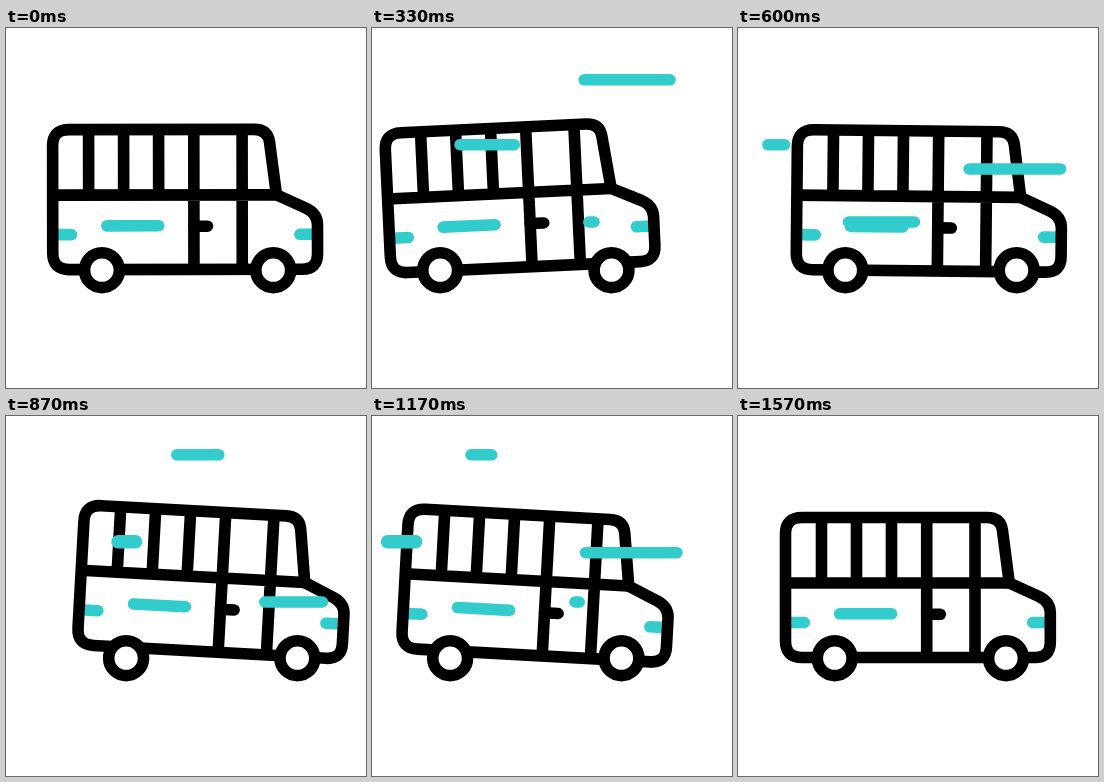
Animation of 360 by 360 pixels, one loop 1670 ms. Source, as an HTML page:

```html
<!DOCTYPE html>
<html lang="en">
<head>
<meta charset="utf-8">
<title>Bus ride</title>
<style>
  html, body { margin: 0; width: 100%; height: 100%; overflow: hidden; background: #fff; }
  svg { display: block; width: 100vw; height: 100vh; }
  path, circle { fill: none; stroke: #000; stroke-width: 11.6; stroke-linejoin: round; }
  .teal { stroke: #33cccc; stroke-linecap: round; }
  circle { fill: #fff; }
</style>
</head>
<body>
<svg viewBox="0 0 360 360">
  <g id="bus">
    <g id="body">
      <path class="teal" d="M50 206.5H66.3M294.7 206.5H310M101.6 197.8H153.6"/>
      <path d="M47.5 118Q47.5 101.5 64 101.5H249Q262.5 101.5 264.4 114L271.3 167L301 180.5Q312.3 186 312.3 197V226Q312.3 241.5 297 241.5H64Q47.5 241.5 47.5 225Z"/>
      <path d="M47.5 167H271M83.5 101.5V167M118.5 101.5V167M153.5 101.5V167M188.7 101.5V241.5M237 101.5V241.5"/>
      <path stroke-linecap="round" d="M188.7 198.3H202.3"/>
    </g>
    <circle cx="96.7" cy="242.2" r="17.4"/>
    <circle cx="268" cy="242.2" r="17.4"/>
  </g>
  <g id="wind"></g>
</svg>
<script>
const LOOP = 1670;
const TRAVEL = 114; // px each streak runs to the left
const LAG = 165;    // ms the tail trails the head

// Key poses: [time ms, value]
const driveX = [[-33, 0], [320, -28.6], [780, 30.5], [1160, -18.6], [1550, 0]];
const tilt = [[-33, 0], [320, -2.7], [840, 3.15], [1160, 3.15], [1570, 0]];
const bob = [[-33, 0], [320, -2.5], [600, 1.5], [870, -5.5], [1370, 0]];

// Wind streaks: [y, from x, start ms, duration ms, width]
const streaks = [
  [51.8, 300, 145, 270],
  [116.7, 144, 137, 393],
  [194, 222, 287, 344],
  [141, 332, 388, 270],
  [186, 317, 690, 357],
  [38.8, 213, 695, 427],
  [125.7, 129.5, 793, 315, 13.4],
  [136.7, 314.5, 958, 270]
];

const $ = id => document.getElementById(id);
const ease = p => {
  p = Math.min(1, Math.max(0, p));
  return p * p * (3 - 2 * p);
};

function at(keys, t) {
  const i = keys.findIndex(k => k[0] > t);
  if (i < 0) return keys[keys.length - 1][1];
  const [t0, a] = keys[i - 1], [t1, b] = keys[i];
  return a + (b - a) * ease((t - t0) / (t1 - t0));
}

function makeStreak([y, from, start, dur, width = 11.6]) {
  const path = document.createElementNS("http://www.w3.org/2000/svg", "path");
  path.setAttribute("class", "teal");
  path.style.strokeWidth = width;
  $("wind").append(path);
  const x = age => from - TRAVEL * ease(age / dur);
  return t => {
    const age = t - start;
    const on = age > 0 && age < dur + LAG;
    path.setAttribute("d", on ? `M${x(age)} ${y}H${x(age - LAG) + 0.01}` : "");
  };
}

const drawStreaks = streaks.map(makeStreak);

function draw(t) {
  $("bus").setAttribute("transform", `translate(${at(driveX, t)} 0)`);
  $("body").setAttribute("transform", `translate(0 ${at(bob, t)}) rotate(${at(tilt, t)} 182.3 242)`);
  drawStreaks.forEach(f => f(t));
}

const begin = performance.now();
function tick() {
  draw((performance.now() - begin) % LOOP);
  requestAnimationFrame(tick);
}
tick();
</script>
</body>
</html>
```
